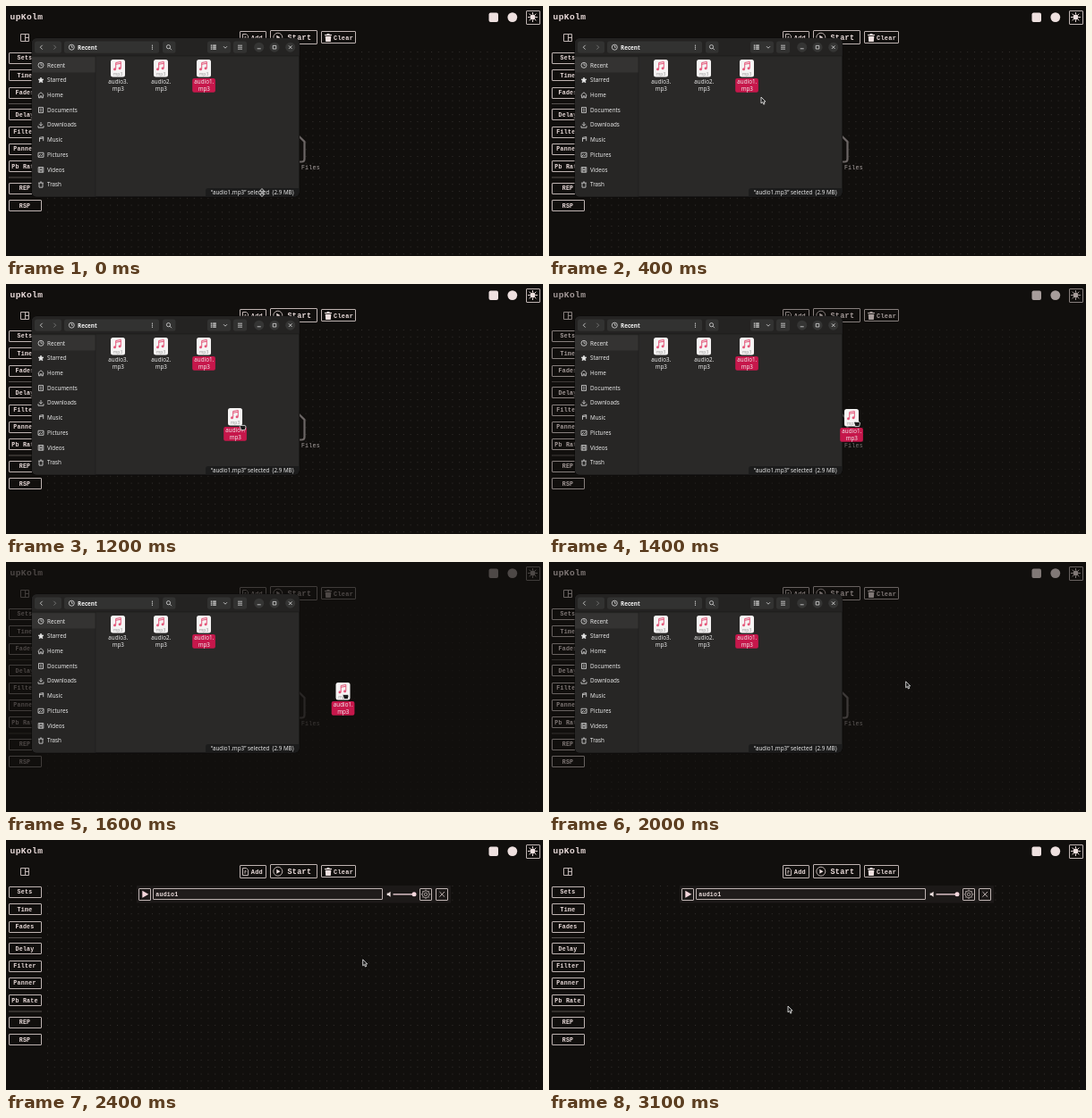
These frames come from a looping animation (600x280 px, 3.2 s). An HTML page:

```html
<!DOCTYPE html>
<html lang="en">
<head>
<meta charset="utf-8">
<style>
  html, body { margin: 0; height: 100%; overflow: hidden; background: #110f0d; }
  svg { display: block; width: 600px; height: 280px; }
  text { white-space: pre; }
  .mono { font: bold 6.6px "Courier New", "Liberation Mono", monospace; letter-spacing: .04em; fill: #eadcdb; }
  .ui { font: 500 6.3px "Open Sans", "Noto Sans", sans-serif; fill: #f4f4f4; }
  .line { fill: none; stroke: #bfb4b2; stroke-width: 1; }
  .thin { fill: none; stroke: #dcdcdc; stroke-width: .8; }
  .mid { text-anchor: middle; }
</style>
</head>
<body>
<svg id="stage" viewBox="0 0 600 280"></svg>
<script>
const PERIOD = 3200, STEP = 100;
const PINK = '#f4d6dc', PALE = '#eee0df';

const rect = (x, y, w, h, fill, r = 0) =>
  `<rect x="${x}" y="${y}" width="${w}" height="${h}" rx="${r}" fill="${fill}"/>`;
// Border one pixel wide, kept on the pixel grid.
const frame = (x, y, w, h) =>
  `<rect class="line" x="${Math.floor(x) + .5}" y="${Math.floor(y) + .5}"
    width="${Math.round(w)}" height="${Math.round(h)}" rx=".5"/>`;
const dot = (x, y, r, fill) => `<circle cx="${x}" cy="${y}" r="${r}" fill="${fill}"/>`;
const text = (x, y, s, cls, style = '') =>
  `<text x="${x}" y="${y}" class="${cls}" style="${style}">${s}</text>`;
const icon = (x, y, d, cls = 'thin', attrs = '') =>
  `<path class="${cls}" transform="translate(${x} ${y})" d="${d}" ${attrs}/>`;
const solid = (x, y, d, fill = PALE) => icon(x, y, d, '', `fill="${fill}"`);
const group = (id, body) => `<g id="${id}">${body}</g>`;
const ring = r => `M${-r} 0A${r} ${r} 0 1 1 ${r} 0A${r} ${r} 0 1 1 ${-r} 0`;
const rays = (n, a, b) => Array.from({ length: n }, (_, i) => {
  const c = Math.cos(i * 2 * Math.PI / n), s = Math.sin(i * 2 * Math.PI / n);
  return `M${c * a} ${s * a}L${c * b} ${s * b}`;
}).join('');

const CLOCK = ring(3) + 'M0-2V0H1.6';
const BIN = 'M-2.8-2H2.8M-2-2V3H2V-2M-1-3H1';
const NOTE = 'M-1.5 2V-2.6L2.7-3.4V1.2M-1.5-1.2L2.7-2';

function page() {
  const labels = ['Sets', 'Time', 'Fades', 'Delay', 'Filter', 'Panner', 'Pb Rate', 'REP', 'RSP'];
  const centers = [58.5, 77.7, 97.2, 121.7, 141, 160.3, 179.8, 204.2, 223.7];
  const side = labels.map((s, i) =>
    frame(3, centers[i] - 6, 36, 12) + text(21, centers[i] + 1.9, s, 'mono mid')).join('');
  return rect(44, 49, 556, 231, 'url(#dots)') +
    text(4.5, 15, 'upKolm', 'mono', 'font-size:9.6px') +
    rect(539.5, 7.5, 10.5, 10.5, PALE, 2) + dot(565.8, 12.6, 5.4, PALE) +
    frame(581, 5, 14.5, 14.5) + dot(588.5, 12.5, 3, PALE) +
    icon(588.5, 12.5, rays(8, 3.4, 5.4), 'line', `style="stroke:${PALE}"`) +
    icon(21, 35.5, 'M-4.5-4H4.5V4H-4.5ZM.5-4V4M.5 0H4.5', 'line') +
    frame(261, 28.5, 28.5, 14) + icon(267.5, 35.5, 'M-3-4H1L3-2V4H-3ZM-.5 2.2V-1L1.2-.4', 'line') +
    text(273.8, 38, 'Add', 'mono', 'font-size:6.9px') +
    frame(295, 27.5, 52, 15) + icon(303.8, 35.2, ring(5), 'line') +
    solid(303.8, 35.2, 'M-1.5-2.5L2.7 0L-1.5 2.5Z') +
    text(314.5, 38, 'Start', 'mono', 'font-size:8.4px') +
    frame(352.5, 28.8, 37.5, 13.4) + solid(360, 35.5, 'M-4-3.5H-1.5V-4.5H1.5V-3.5H4V-2.4H-4ZM-3.3-1.8H3.3L2.8 4.5H-2.8Z') +
    text(366, 38, 'Clear', 'mono', 'font-size:6.9px') +
    side + icon(3, 109.5, 'M0 0H37M0 82.5H37', 'line', 'stroke-opacity=".4"') +
    group('empty',
      icon(321, 160, 'M-10-14.5H6L12.5-8V11.5Q12.5 14.5 9.5 14.5H-10Q-13 14.5-13 11.5V-11.5Q-13-14.5-10-14.5Z',
        'line', 'style="stroke:#6c6665;stroke-width:2.2"') +
      text(351, 183.3, 'No Files', 'mono', 'text-anchor:end;font-weight:400;fill:#aaa2a1')) +
    group('track', rect(146, 51, 351, 19.5, '#1c1918') +
      frame(148.7, 54.2, 13, 13) + solid(155.3, 60.8, 'M-3-4L4 0L-3 4Z', PINK) +
      rect(164.5, 54.5, 256, 12, '#201c1b') + frame(164.5, 54.5, 256, 12) +
      text(167.2, 62.7, 'audio1', 'mono') +
      solid(428, 60.8, 'M-2.3-1.2H-.7L1.6-3V3L-.7 1.2H-2.3Z') +
      rect(432.5, 60.2, 24, 1.3, PINK) + dot(456, 60.8, 2.5, PINK) +
      frame(462.6, 54.2, 13, 13) +
      icon(469, 60.8, ring(4) + ring(1.7) + rays(8, 4, 5.3), 'line', 'style="stroke-width:.8"') +
      frame(480.7, 54.2, 13, 13) + icon(487.2, 60.8, 'M-2.8-2.8L2.8 2.8M2.8-2.8L-2.8 2.8', 'line'));
}

// One file, placed by the centre of its icon.
const file = (x, y, name, picked) => `<g transform="translate(${x} ${y})">` +
  rect(-8, -10, 16, 19.6, '#f6f4f4', 2.5) +
  icon(0, -2.5, 'M-2.3 3V-4L3.3-5V2M-2.3-2.2L3.3-3.2', 'thin', 'style="stroke:#e4577a;stroke-width:1"') +
  dot(-3.5, .8, 1.5, '#e4577a') + dot(2.1, -.3, 1.5, '#e4577a') +
  text(0, 7.8, 'mp3', 'ui mid', 'font-size:5px;fill:#999') +
  (picked ? rect(-12.8, 11, 25.7, 15.8, '#c6174b', 2) : '') +
  text(.3, 17.2, name + '.', 'ui mid') + text(.3, 24.6, 'mp3', 'ui mid') + '</g>';

function fileWindow() {
  const places = [
    ['Recent', CLOCK],
    ['Starred', 'M0-3L.9-1L3-.8L1.4.6L1.9 2.8L0 1.6L-1.9 2.8L-1.4.6L-3-.8L-.9-1Z', '#e8e8e8'],
    ['Home', 'M-3.4.2L0-3L3.4.2M-2.4 0V3H-.8V1H.8V3H2.4V0'],
    ['Documents', 'M-2.5-3H2.5V3H-2.5ZM-1.2-1H1.2M-1.2 1H1.2'],
    ['Downloads', 'M0-3.2V1M-2-1L0 1L2-1M-3 1V3H3V1'],
    ['Music', NOTE],
    ['Pictures', 'M-3-2.4H3V2.6H-3ZM-2.5 2L-.6-.2L.6 1L2.6-1'],
    ['Videos', 'M-2.8-2.8H2.8V2.8H-2.8ZM-1.2-2.8V2.8M1.2-2.8V2.8M-1.2 0H1.2'],
    ['Trash', BIN]
  ];
  const side = places.map(([name, d, fill], i) => {
    const y = 66.3 + i * 16.73;
    return icon(39, y, d, 'thin', fill ? `style="fill:${fill}"` : '') + text(46, y + 2.2, name, 'ui');
  }).join('');
  const button = (x, w) => rect(x, 39.5, w, 13.3, '#323231', 2.5);
  return rect(28.5, 35.8, 299.6, 178.4, '#060606', 6) + rect(29, 36.2, 298.6, 177.4, '#2a2928', 5.5) +
    `<path d="M29 56V208Q29 213.6 34.5 213.6H100V56Z" fill="#272625"/>` +
    `<path d="M29 56V41.7Q29 36.2 34.5 36.2H322Q327.6 36.2 327.6 41.7V56Z" fill="#242322"/>` +
    rect(29, 55.6, 298.6, .7, '#1b1b1a') + rect(99.6, 56, .7, 157.6, '#1f1f1e') +
    rect(29, 57.2, 70.6, 17.3, '#343332') +
    button(32, 30) + button(65, 106) + button(175, 14.5) + button(225, 26) + button(254, 15) +
    icon(39.5, 46.2, 'M1.2-2.4L-1.2 0L1.2 2.4') +
    icon(54.5, 46.2, 'M-1.2-2.4L1.2 0L-1.2 2.4', 'thin', 'opacity=".45"') +
    icon(73.3, 46.2, CLOCK) + text(80, 48.6, 'Recent', 'ui', 'font-weight:700') +
    [-2, 0, 2].map(d => dot(163.5, 46.2 + d, .6, '#ddd')).join('') +
    icon(181.5, 45.7, ring(2.1) + 'M1.5 1.5L3.5 3.5') +
    icon(231.8, 46.2, 'M-3-2H-1.4M-3 0H-1.4M-3 2H-1.4M-.6-2H3M-.6 0H3M-.6 2H3', 'thin', 'style="stroke-width:1.3"') +
    icon(245, 46.2, 'M-2-1L0 1L2-1') + icon(261.5, 46.2, 'M-2.5-2H2.5M-2.5 0H2.5M-2.5 2H2.5') +
    [282.7, 300, 317.7].map(x => dot(x, 46.2, 5.5, '#353534')).join('') +
    icon(282.7, 46.2, 'M-2 1.6H2') + icon(300, 46.2, 'M-1.8-1.8H1.8V1.8H-1.8Z') +
    icon(317.7, 46.2, 'M-1.8-1.8L1.8 1.8M1.8-1.8L-1.8 1.8') +
    side + file(125, 70, 'audio3') + file(173, 70, 'audio2') + file(221, 70, 'audio1', true) +
    `<path d="M223 213.6V207Q223 204 226 204H327.6V208Q327.6 213.6 322 213.6Z" fill="#1c1c1c"/>` +
    text(229, 211, '“audio1.mp3” selected  (2.9 MB)', 'ui');
}

const outlined = (d, fill) => `<path d="${d}" fill="${fill}" stroke="#f2f2f2" stroke-width=".8"/>`;

document.getElementById('stage').innerHTML =
  `<defs><pattern id="dots" x="46" y="51" width="7.8" height="7.8" patternUnits="userSpaceOnUse">
    ${rect(0, 0, 1, 1, '#322e2c')}</pattern></defs>` +
  rect(0, 0, 600, 280, '#110f0d') + group('page', page()) + group('files', fileWindow()) +
  group('ghost', file(0, 0, 'audio1', true)) +
  group('hand', outlined('M-3.2-1.5Q-3-3-1.5-2.6H2.5Q3.5-2.4 3.4-.5L2.6 2.6H-1.8Z', '#1b1b1b')) +
  group('resize', outlined('M0-4.5L2.4-1.8H.8V1.8H2.4L0 4.5L-2.4 1.8H-.8V-1.8H-2.4Z', '#1b1b1b')) +
  group('arrow', outlined('M0 0V7L1.6 5.6L2.8 8.2L4 7.6L2.9 5.1H5Z', '#1b1b1b'));

// Keys are [time, ...values], joined by straight lines.
const pointerPath = [[0, 286, 207], [200, 273, 176], [400, 237, 102], [600, 220.5, 73], [800, 220.5, 73],
  [1900, 398.7, 133.8], [2700, 398.7, 133.8], [2900, 331, 164], [3100, 267, 186]];
const ghostPath = [[900, 222, 74], [1000, 230, 94], [1200, 256, 149], [1300, 301, 151],
  [1400, 338, 150], [1600, 376.5, 145], [1800, 395, 131]];
const handPath = [[900, 227, 84], [1000, 236, 108], [1200, 264.5, 161], [1300, 309, 160],
  [1400, 344, 157], [1600, 379.5, 151], [1800, 398, 137]];
const pageOpacity = [[1300, 1], [1400, .68], [1500, .4], [1600, .27], [1800, .24], [1900, .24],
  [2000, .5], [2100, .8], [2200, .95], [2300, 1]];

function at(keys, t) {
  const i = keys.findIndex(k => k[0] >= t);
  if (i < 0) return keys[keys.length - 1].slice(1);
  if (!i) return keys[0].slice(1);
  const [a, b] = [keys[i - 1], keys[i]], p = (t - a[0]) / (b[0] - a[0]);
  return a.slice(1).map((v, j) => v + (b[j + 1] - v) * p);
}

const el = id => document.getElementById(id);
const show = (id, on) => { el(id).style.display = on ? '' : 'none'; };
const move = (id, [x, y]) => el(id).setAttribute('transform', `translate(${x} ${y})`);

function draw(t) {
  const dragging = t >= 900 && t < 2000, resizing = t < 100, loaded = t >= 2100;
  el('page').setAttribute('opacity', at(pageOpacity, t)[0]);
  show('files', t < 2400);
  show('empty', !loaded);
  show('track', loaded);
  show('ghost', dragging);
  show('hand', dragging);
  show('resize', resizing);
  show('arrow', !dragging && !resizing);
  move('ghost', at(ghostPath, t));
  move('hand', at(handPath, t));
  move('resize', [286, 209]);
  move('arrow', at(pointerPath, t));
}

const start = performance.now();
function tick() {
  const t = (performance.now() - start) % PERIOD;
  draw(Math.floor(t / STEP) * STEP);
  requestAnimationFrame(tick);
}
tick();
</script>
</body>
</html>
```
